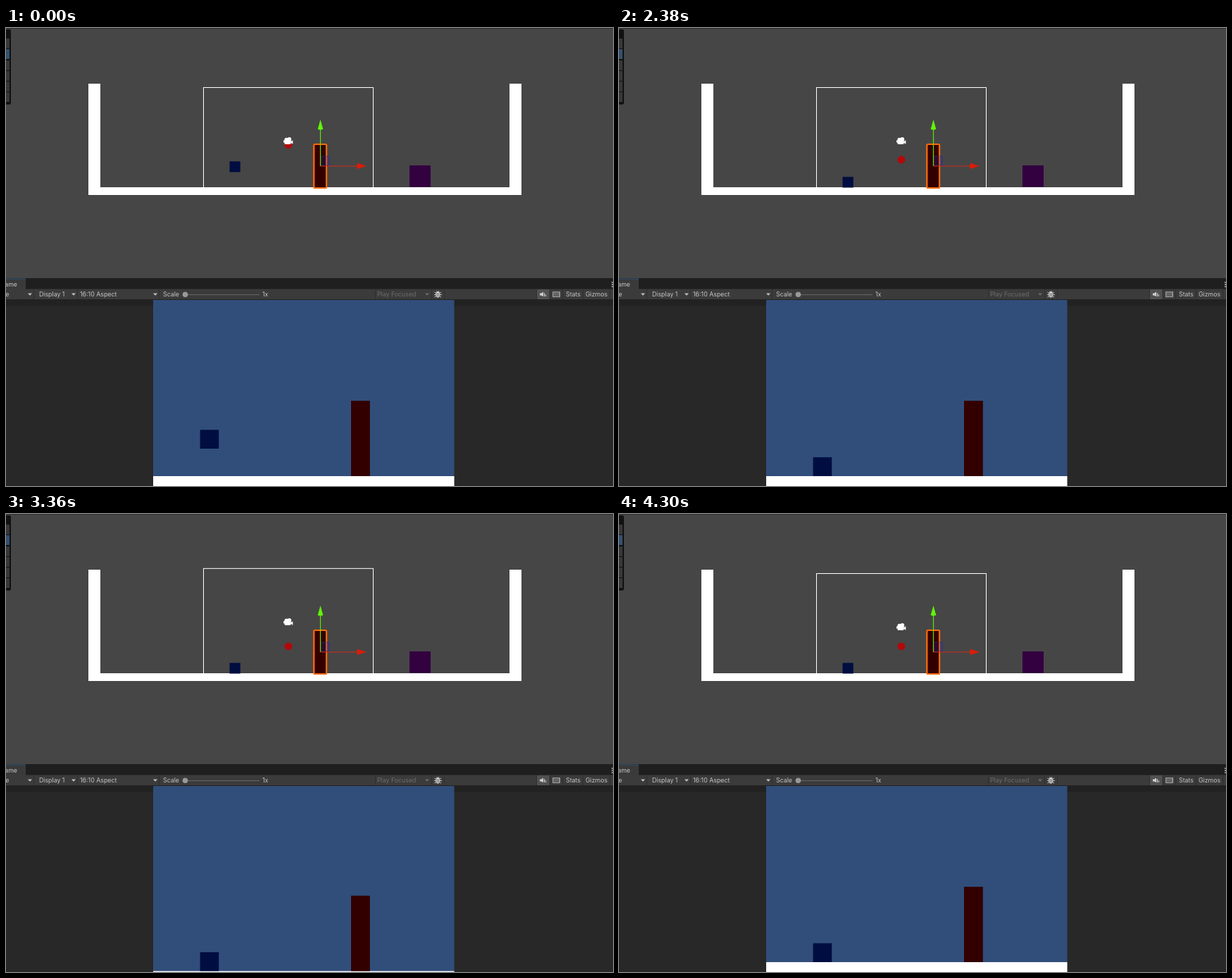
Animation of 862x650 px, one loop 4950 ms. Source, as an HTML page:

```html
<!DOCTYPE html>
<html lang="en">
<head>
<meta charset="utf-8">
<title>Falling cube and camera shake</title>
<style>
  html, body { margin: 0; width: 100%; height: 100%; overflow: hidden; background: #282828; }
  svg { display: block; width: 862px; height: 650px; }
  text { font: 8.8px Inter, "Open Sans", sans-serif; fill: #c4c4c4; }
</style>
</head>
<body>
<svg viewBox="0 0 862 650">
  <defs>
    <clipPath id="view"><rect x="209" y="386" width="427.5" height="264"/></clipPath>
    <path id="arrow" d="M-3 -1.5H3L0 1.8Z"/>
  </defs>

  <!-- scene view -->
  <rect width="862" height="355" fill="#464646"/>
  <rect width="862" height="1" fill="#2b2b2b"/>
  <path d="M0 2H5Q7 2 7 4V106Q7 108.500 5 108.500H0Z" fill="#111"/>
  <g id="tools" fill="#383838"></g>

  <path d="M117 79H134V226H715V79H732V237H117Z" fill="#fff"/>
  <rect x="573" y="195" width="30" height="30.500" fill="#330040"/>
  <rect id="cube" x="317.500" y="189.300" width="15.300" height="15.200" fill="#000d40"/>
  <rect id="bounds" x="280.500" y="84.500" width="241" height="151" fill="none" stroke="#fff"/>

  <rect x="437.300" y="165" width="17.800" height="62" rx="1.500" fill="#300" stroke="#ff6a0a" stroke-width="2.200"/>
  <circle id="target" cx="401" cy="165.800" r="5.400" fill="#b40808"/>
  <g id="camera" fill="#fff">
    <circle cx="398.300" cy="158.600" r="2.900"/>
    <circle cx="402.300" cy="158" r="2.900"/>
    <rect x="395.500" y="158.500" width="9" height="6.500" rx="1.500"/>
    <path d="M394 159.500H397V162.500H394ZM403 162L407.300 159.300V164.800Z"/>
  </g>

  <rect x="447" y="182" width="12.500" height="13" fill="#2424a8" fill-opacity=".25" stroke="#30308c" stroke-opacity=".6"/>
  <path d="M446.500 196V143" stroke="#5de300" stroke-width="1.200"/>
  <path d="M446.500 130L450.300 143.500Q446.500 145.500 442.700 143.500Z" fill="#62f50a"/>
  <path d="M447 196H500" stroke="#d02a18" stroke-width="1.200"/>
  <path d="M512 196L499 200Q497.500 196 499 191.800Z" fill="#dc1c06"/>

  <!-- game panel -->
  <rect y="355" width="862" height="295" fill="#282828"/>
  <rect y="355" width="862" height="15.500" fill="#1f1f1f"/>
  <rect y="356" width="28" height="15" fill="#3a3a3a"/>
  <rect y="355.500" width="28" height="1" fill="#35597f"/>
  <text x="16" y="367" text-anchor="end">Game</text>
  <g fill="#c4c4c4">
    <circle cx="861" cy="361" r=".9"/><circle cx="861" cy="364" r=".9"/><circle cx="861" cy="367" r=".9"/>
  </g>
  <rect y="370.500" width="862" height="15" fill="#3b3b3b"/>
  <rect y="385" width="862" height="9.500" fill="#222"/>
  <path id="dividers" stroke="#2f2f2f"/>
  <g id="labels"></g>
  <g id="arrows" fill="#c4c4c4"></g>
  <path d="M258 378.500H360" stroke="#666"/>
  <circle cx="254.500" cy="378.300" r="3.800" fill="#999"/>

  <g stroke="#d0d0d0" fill="none" stroke-width=".9">
    <path d="M608.500 375L611 376.500M618 375L615.500 376.500M608 378.500H619M608.500 382L611 380.500M618 382L615.500 380.500M611.500 373L613 375M615 373L613.500 375"/>
    <ellipse cx="613.300" cy="378.300" rx="2.800" ry="3.900" fill="#d0d0d0"/>
    <path d="M611 377.500H615.500M611 380H615.500" stroke="#3b3b3b" stroke-width=".8"/>
  </g>
  <rect x="754" y="371" width="17.500" height="14" fill="#515151"/>
  <path d="M758 376.500H760L763 374.500V381L760 379.500H758Z" fill="#d0d0d0"/>
  <path d="M764.500 376V381M766.300 378V381" stroke="#d0d0d0"/>
  <rect x="776.800" y="374.800" width="9.500" height="6.500" fill="none" stroke="#c4c4c4"/>
  <path d="M778 377H786M778 379H786" stroke="#c4c4c4" stroke-width="1.100" stroke-dasharray="1.300 .8"/>

  <!-- game view -->
  <g clip-path="url(#view)">
    <rect x="209" y="386" width="428" height="264" fill="#314e7a"/>
    <g id="world">
      <rect x="209" y="636" width="428" height="19" fill="#fff"/>
      <rect x="490" y="529" width="26.800" height="107" fill="#300"/>
      <rect id="bigCube" x="275.600" y="570.300" width="26.600" height="26.700" fill="#000d40"/>
    </g>
  </g>
</svg>
<script>
const LOOP = 4950;
const ZOOM = 1.77;                        // game pixels per scene pixel
const DROP = 22;
const FALL = { start: 1465, end: 1973 };
const LAG = 170;                          // damping of the follower, ms
const SHAKE = [                           // time, camera offset downwards
  [2425, 0], [2500, -25], [2630, 24], [2825, -17],
  [3070, 24.4], [3450, -9], [3800, 2.2], [4290, 0]
];

const $ = id => document.getElementById(id);
const shift = (id, y) => $(id).setAttribute("transform", `translate(0 ${y.toFixed(2)})`);

$("tools").innerHTML = [15, 30, 46, 61, 76, 91].map((y, i) =>
  `<rect y="${y}" width="5" height="14" ${i === 1 ? 'fill="#35506e"' : ""}/>`).join("");
$("dividers").setAttribute("d", [39.5, 101.5, 217.5, 524.5, 604.5, 622.5, 753.5, 772.5, 790.5, 819.5, 857.5]
  .map(x => `M${x} 371V385`).join(""));
$("labels").innerHTML = [
  [-20, "Game"], [47, "Display 1"], [105, "16:10 Aspect"], [223, "Scale"], [364, "1x"],
  [527, "Play Focused", "#6c6c6c"], [795, "Stats"], [823, "Gizmos"]
].map(([x, label, color = "#c4c4c4"]) =>
  `<text x="${x}" y="381.2" style="fill:${color}">${label}</text>`).join("");
$("arrows").innerHTML = [34, 96, 212, 598].map(x =>
  `<use href="#arrow" x="${x}" y="378" ${x > 500 ? 'fill="#6c6c6c"' : ""}/>`).join("");

function fallAt(t) {
  const p = Math.min(1, Math.max(0, (t - FALL.start) / (FALL.end - FALL.start)));
  return DROP * p * p;
}

// Closed form of a first-order lag behind the falling cube.
function followAt(t) {
  if (t <= FALL.start) return 0;
  const span = FALL.end - FALL.start;
  const u = Math.min(t - FALL.start, span);
  const y = DROP / span ** 2 *
    (u * u - 2 * LAG * u + 2 * LAG * LAG * (1 - Math.exp(-u / LAG)));
  return t < FALL.end ? y : DROP - (DROP - y) * Math.exp((FALL.end - t) / LAG);
}

function shakeAt(t) {
  const i = SHAKE.findIndex(([time]) => time > t);
  if (i < 1) return 0;
  const [t0, y0] = SHAKE[i - 1];
  const [t1, y1] = SHAKE[i];
  const p = (t - t0) / (t1 - t0);
  return y0 + (y1 - y0) * p * (2 - p);
}

function draw(t) {
  const fall = fallAt(t);
  const shake = shakeAt(t);
  shift("cube", fall);
  shift("bigCube", fall * ZOOM);
  shift("target", followAt(t));
  shift("bounds", shake);
  shift("camera", shake);
  shift("world", -shake * ZOOM);
}

const began = performance.now();
function tick() {
  draw((performance.now() - began) % LOOP);
  requestAnimationFrame(tick);
}
tick();
</script>
</body>
</html>
```
